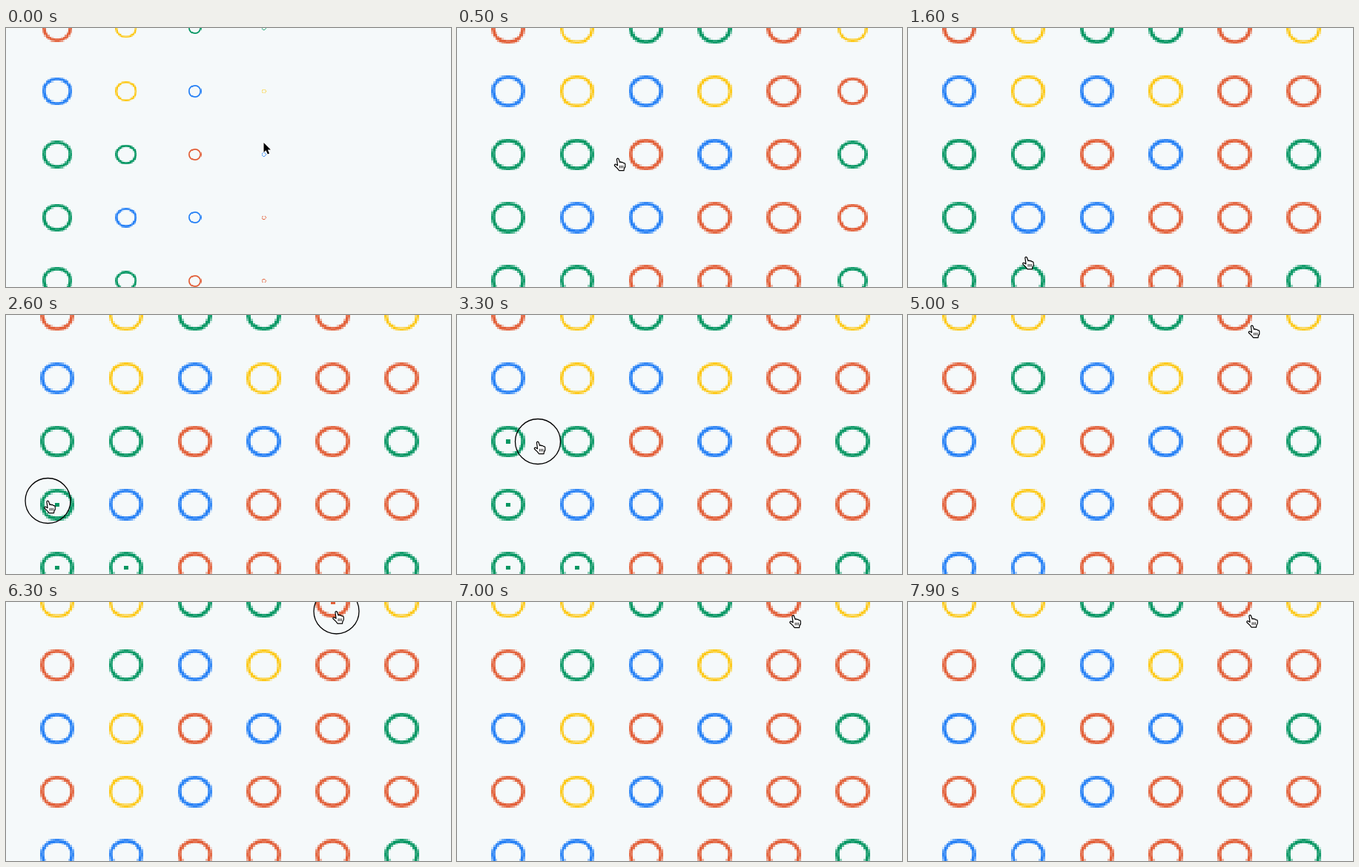
An HTML page with a canvas for the animation above (8 s loop, 600 by 350 pixels).

```html
<!DOCTYPE html>
<html lang="en">
<head>
<meta charset="utf-8">
<title>Dots</title>
<style>
html, body { margin: 0; width: 100%; height: 100%; overflow: hidden; background: #f5f9fa; }
canvas { display: block; }
</style>
</head>
<body>
<canvas id="stage" width="600" height="350"></canvas>
<script>
const LOOP = 8000, STEP = 100, POP = 3800, ROW_TIME = 200;
const ctx = document.getElementById('stage').getContext('2d');
const colors = { r: '#e25f38', b: '#2680f5', g: '#049662', y: '#fdc60b' };

// Board after the drop, one string per column, and how many rows each dot falls.
const board = ['yrbrb', 'ygyyb', 'gbrbr', 'gybrr', 'rrrrr', 'yrgrg'];
const drops = ['33333', '22221'];

// Linked dots: column, row, time of touch.
const chain = [[1, 4, 2000], [0, 4, 2300], [0, 3, 2500], [0, 2, 3000], [1, 2, 3500]];
const presses = [[2000, POP], [6200, 6700]];

// Pointer path: time, x, y.
const path = [
  [0, 347.5, 155], [500, 217, 176], [1000, 178, 240], [1800, 156, 322],
  [2000, 155, 334], [2300, 62, 336], [2600, 56.5, 251], [3000, 58, 178],
  [3600, 160, 164], [3900, 162.5, 163], [4300, 180, 154], [5000, 464, 14],
  [5700, 456, 18], [6300, 445.5, 12.5], [6700, 447, 14], [7300, 460, 22], [7900, 461.5, 17.5]
];

const clamp = v => Math.max(0, Math.min(1, v));
const between = (t, [a, b]) => t >= a && t < b;

// Small ring bitmaps, enlarged without smoothing to keep their blocky edge.
function makeRing(key, dotted) {
  const c = document.createElement('canvas');
  c.width = c.height = 16;
  const g = c.getContext('2d');
  g.strokeStyle = g.fillStyle = colors[key];
  g.lineWidth = key === 'y' ? 1.45 : 1.75;
  g.arc(8, 8, 8 - g.lineWidth / 2, 0, 7);
  g.stroke();
  if (dotted) g.fillRect(7, 7, 2, 2);
  return c;
}
const rings = {};
for (const key in colors) rings[key] = [makeRing(key, false), makeRing(key, true)];

function dot(key, col, row, scale, dotted = false, alpha = 1) {
  if (scale <= 0 || alpha <= 0) return;
  const w = 46.5 * scale, h = 42.67 * scale;
  ctx.globalAlpha = alpha;
  ctx.imageSmoothingEnabled = scale < 0.3;
  ctx.drawImage(rings[key][+dotted], 69 + 92.9 * col - w / 2, 85.4 * row + 0.1 - h / 2, w, h);
  ctx.globalAlpha = 1;
}

function pointerAt(t) {
  const i = path.findIndex(p => p[0] >= t);
  if (i < 1) return path[0].slice(1);
  const [t0, x0, y0] = path[i - 1], [t1, x1, y1] = path[i];
  const p = (t - t0) / (t1 - t0), e = p * p * (3 - 2 * p);
  return [x0 + (x1 - x0) * e, y0 + (y1 - y0) * e];
}

const arrow = new Path2D('M0 0V13L3 10.3L5.3 15.5L7.6 14.5L5.4 9.6H9.4Z');
const hand = new Path2D('M-1.6 1.2Q-.6-.8 1 1L2.6 5.6Q3.6 4.2 5 5.8Q6.4 4.8 7.4 6.6' +
  'Q9.4 6 9.8 8.6Q10.4 11.6 8.4 14L8 16.6H1.6L-.8 13.6L-4.6 10Q-5 7.6-2.6 8.4L-.4 9.8Z');
const fingers = new Path2D('M2.6 9.8V13.4M4.7 9.8V13.4M6.8 9.8V13.4');

function drawPointer(t) {
  const [x, y] = pointerAt(t);
  ctx.save();
  ctx.translate(x, y);
  ctx.lineJoin = 'round';
  ctx.strokeStyle = '#000';
  if (presses.some(p => between(t, p))) {
    ctx.lineWidth = 1.3;
    ctx.beginPath();
    ctx.arc(0, 0, 30.5, 0, 7);
    ctx.stroke();
  }
  if (t < 400 || between(t, [POP, 4400])) {
    ctx.lineWidth = 1.6;
    ctx.strokeStyle = '#fff';
    ctx.stroke(arrow);
    ctx.fillStyle = '#000';
    ctx.fill(arrow);
  } else {
    ctx.lineWidth = 1.2;
    ctx.fillStyle = '#fff';
    ctx.fill(hand);
    ctx.stroke(hand);
    ctx.lineWidth = 0.9;
    ctx.stroke(fingers);
  }
  ctx.restore();
}

function draw(t) {
  ctx.fillStyle = '#f5f9fa';
  ctx.fillRect(0, 0, 600, 350);
  const fallen = Math.max(0, (t - POP) / ROW_TIME);

  board.forEach((keys, col) => {
    const scale = clamp((t + 350 - 100 * col) / 400);
    [...keys].forEach((key, row) => {
      const drop = drops[col] ? +drops[col][row] : 0;
      const touched = col === 4 && row === 0 && between(t, presses[1]);
      dot(key, col, row - Math.max(0, drop - fallen), scale, touched);
    });
  });

  const pop = clamp((t - POP) / 200);
  for (const [col, row, touch] of chain) {
    const grow = clamp((t + 350 - 100 * col) / 400);
    dot('g', col, row, grow * (1 + pop), t >= touch, 1 - pop);
  }
  drawPointer(t);
}

const start = performance.now();
function tick() {
  const t = (performance.now() - start) % LOOP;
  draw(Math.floor(t / STEP) * STEP);
  requestAnimationFrame(tick);
}
tick();
</script>
</body>
</html>
```
